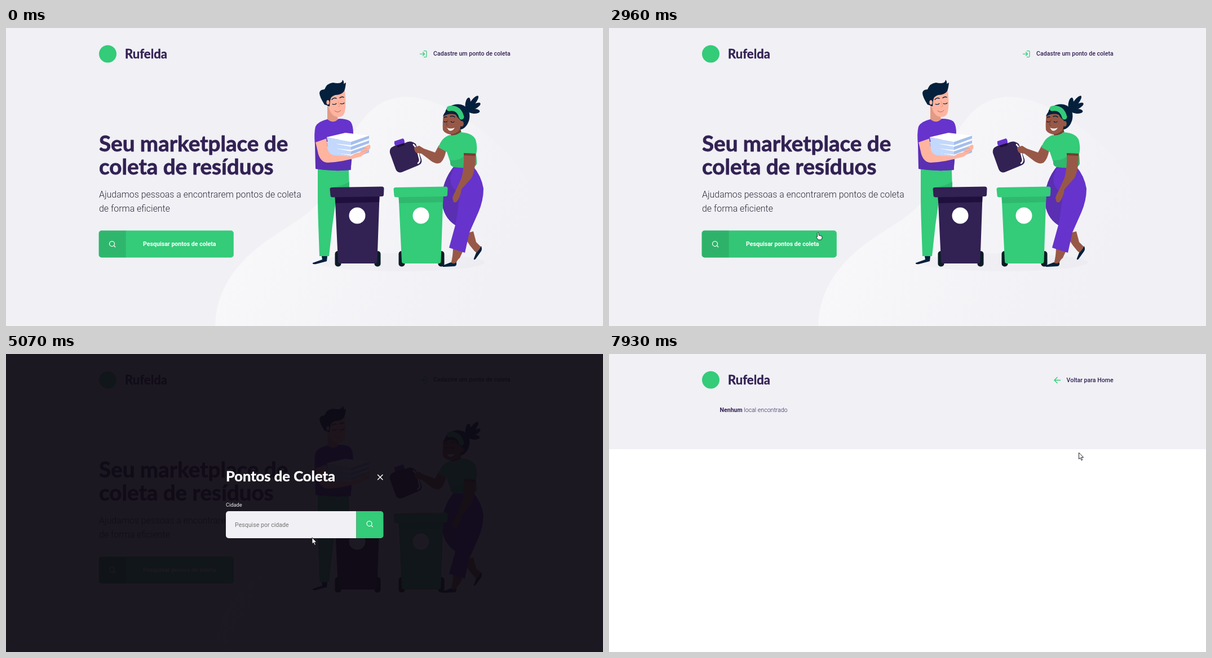
An HTML page with a canvas that plays this animation: 1059x529 px, repeating every 8 s.

```html
<!DOCTYPE html>
<html lang="pt">
<head>
<meta charset="utf-8">
<title>Pontos de coleta</title>
<style>
html, body { margin: 0; width: 100%; height: 100%; overflow: hidden; background: #f0f0f5; }
canvas { display: block; }
</style>
</head>
<body>
<canvas id="stage" width="1059" height="529"></canvas>
<script>
const ctx = document.getElementById('stage').getContext('2d');
const W = 1059, H = 529, LOOP = 8000;
const BG = '#f0f0f5', GREEN = '#34cb79', GREEN_DARK = '#2fb86e', INK = '#322153', TEXT = '#2f2a3a';
const PURPLE = '#6633cc', PURPLE_DARK = '#5a2fb2', NAVY = '#04203c', WHEEL = '#0b1d26';
const SKIN = '#ffb4a0', SKIN_DARK = '#e29a84', BROWN = '#985847', BROWN_DARK = '#70402f';
const BRAND = 'Rufelda';
const HEAD = 'Lato, "Open Sans", sans-serif', BODY = 'Roboto, "Open Sans", sans-serif';

function fill(color, d) {
  ctx.fillStyle = color;
  ctx.fill(new Path2D(d));
}

function line(color, width, d) {
  ctx.strokeStyle = color;
  ctx.lineWidth = width;
  ctx.lineCap = ctx.lineJoin = 'round';
  ctx.stroke(new Path2D(d));
}

function rect(color, x, y, w, h, r = 0) {
  ctx.fillStyle = color;
  ctx.beginPath();
  ctx.roundRect(x, y, w, h, r);
  ctx.fill();
}

function oval(color, x, y, rx, ry = rx, turn = 0) {
  ctx.fillStyle = color;
  ctx.beginPath();
  ctx.ellipse(x, y, rx, ry, turn, 0, Math.PI * 2);
  ctx.fill();
}

function text(str, x, y, size, weight, color, family = BODY) {
  ctx.font = `${weight} ${size}px ${family}`;
  ctx.fillStyle = color;
  ctx.fillText(str, x, y);
  return x + ctx.measureText(str).width;
}

// Bold heading with slightly thickened strokes
function heading(str, x, y, size, color) {
  text(str, x, y, size, 700, color, HEAD);
  ctx.strokeStyle = color;
  ctx.lineWidth = size * .02;
  ctx.lineJoin = 'round';
  ctx.strokeText(str, x, y);
}

function searchIcon(x, y) {
  ctx.strokeStyle = '#fff';
  ctx.lineWidth = 1.25;
  ctx.beginPath();
  ctx.arc(x, y, 4.5, 0, Math.PI * 2);
  ctx.stroke();
  line('#fff', 1.25, `M${x + 3.3},${y + 3.3}l2.500,2.500`);
}

function drawBrand() {
  oval(GREEN, 180.5, 46, 15.5);
  heading(BRAND, 211, 53.5, 22.1, INK);
}

function drawBackdrop() {
  rect(BG, 0, 0, W, H);
  const g = ctx.createLinearGradient(480, 270, 860, 480);
  g.addColorStop(0, '#f8f8fa');
  g.addColorStop(1, BG);
  fill(g, 'M371,529C373,460 412,414 462,378C505,347 545,332 569,288C600,225 625,122 711,122' +
    'C790,124 885,208 918,259C965,330 950,430 900,529Z');
  oval('rgba(50,33,83,.018)', 700, 416, 150, 16);
}

function drawMan() {
  // Legs and shoe
  fill(GREEN, 'M553,249L608,252L609,290L586,300L579,350L573,405L556,405C555,370 553,330 553,300Z');
  fill(GREEN_DARK, 'M609,273L609,283L580,283Q598,280 609,273Z');
  fill(NAVY, 'M560,405L570,405L569,414L550,419Q543,420 544,417L561,411Z');
  // Neck and shirt
  fill(SKIN_DARK, 'M570,138L588,154L589,164Q581,170 570,164Z');
  fill(PURPLE, 'M570,162Q581,171 590,161Q605,161 611,166Q616,172 616,188L611.500,252Q580,255 549,250' +
    'L548,207Q546,186 549,175Q553,166 570,162Z');
  fill(PURPLE_DARK, 'M549,206L568,196L616,200L611.500,252Q580,255 549,250Z');
  // Face
  fill(SKIN, 'M573,124L584,117L601,111Q604,132 601,149Q598,159 588,158Q576,156 573,141Z');
  fill(NAVY, 'M572,139Q570,137 565,136Q556,122 556,115Q557,109 565,109Q569,98 580,97Q589,99 594,97' +
    'Q597,95 597,92Q600,95 599,99L603,97Q602,107 600,112Q595,119 584,119Q576,121 575,129L574,139Z');
  oval(SKIN, 571, 132, 2.6, 4);
  line(NAVY, 1.1, 'M579,135q4,2 7,-1M593,134q4,2 7,-1');
  line(NAVY, 1.5, 'M578,127q4,-4 8,-2M592,124q4,-3 7,-1');
  line(SKIN_DARK, 1, 'M589,130l3,9l-3,1');
  line('#b96557', 1, 'M583,147q6,5 11,-1');
  // Sheets, lowest first
  for (let y = 25; y >= 0; y -= 8.3) {
    fill('#c3d8fc', `M569,${194 + y}l43,8l0,6l-41,-4z`);
    fill('#a4bfec', `M612,${202 + y}l32,-11l0,5l-32,12z`);
    fill('#fff', `M568,${194 + y}l34,-8l42,5l-32,11z`);
  }
  // Arm
  fill(SKIN, 'M549,202L568,195L571,216Q573,224 582,226L612,228Q617,222 627,221L639,210Q643,206 646,208' +
    'Q648,213 643,217L630,228Q596,238 571,239Q559,239 554,224Z');
  fill(PURPLE, 'M548,190L567,186L569,196L549,203Z');
  line(SKIN_DARK, .8, 'M634,215q3,-2 6,-1M632,220q4,-1 8,-3');
}

function drawBin(x, body, shade) {
  const wheel = dx => rect(WHEEL, x + dx, 396, 11, 27.5, 5);
  wheel(9);
  wheel(79);
  ctx.save();
  ctx.translate(x, 0);
  fill(body, 'M9,298L88,298L84,414Q84,418 80,418L18.500,418Q14.500,418 14.500,414Z');
  fill(shade, 'M9,299L88,299L87.6,309L9.6,311Z');
  fill(body, 'M0,286Q0,283 4,283L92,281.500Q96,281.500 96,285L95.500,296Q95.500,299 92,299L5,300.500Q1,300.500 1,297Z');
  ctx.restore();
  oval('#fff', x + 48.5, 333, 14.5);
}

function drawCan() {
  fill(INK, 'M684,212Q693,206 708,204Q718,198 727,206L737,233Q739,241 731,244L702,256Q694,258 691,250' +
    'L681,222Q680,215 684,212Z');
  line('#fff', 2.6, 'M723,207Q728,212 731,222L734,234Q734,238 731,240');
  fill('#1d0f38', 'M692,208L706,203L707,208L695,212Z');
  fill(PURPLE, 'M689,201L704,196Q707,197 707,204L691,209Q688,206 689,201Z');
}

function drawWoman() {
  // Back leg
  fill(BROWN, 'M817,364L829,361L834,380L843,389L837,401L831,396Q822,386 815,374Z');
  fill(NAVY, 'M843,387Q845,392 843,396L833,410Q829,413 830,409L834,399Q839,395 843,387Z');
  // Front foot
  fill(BROWN, 'M793,389L811,395L805,408Q799,413 798,420L789,419Q793,405 793,389Z');
  fill(NAVY, 'M789,416Q794,420 799,416Q800,423 795,423L776,424Q772,423 776,421Z');
  // Trousers
  fill(PURPLE, 'M795,245L829,246Q843,262 847,285Q847,306 838,327L822,363L814,399L786,390L797,350' +
    'Q775,336 773,306Q774,270 795,245Z');
  fill(PURPLE_DARK, 'M795,246Q773,272 773,306Q775,336 797,350Q803,320 804,292Q788,286 788,265Z');
  // Near arm behind the sleeve
  fill(BROWN, 'M768,208L781,216Q778,233 771,239Q764,243 754,236L737,223L728,222Q725,219 726,213' +
    'L731,210L741,214L761,221Z');
  // Neck and shirt
  fill(BROWN_DARK, 'M789,184L806,177L809,193Q799,199 789,193Z');
  fill(GREEN, 'M787,190Q798,192 806,185Q827,186 833,198Q837,212 834,224L835,241Q833,247 821,249L796,247' +
    'Q787,246 788,238L782,220L767,212Q773,194 787,190Z');
  fill(GREEN_DARK, 'M788,235Q805,236 814,226L834,226L835,241Q833,247 821,249L796,247Q787,246 788,235Z');
  // Far arm
  fill(BROWN, 'M812,222L833,223Q833,252 826,266L808,286Q806,301 799,309Q793,311 793,305Q790,302 797,290' +
    'L808,266Q813,249 812,222Z');
  fill(BROWN_DARK, 'M812,222L833,223L832,227L812,226Z');
  // Hair tufts
  for (const [x, y] of [[821, 124], [837, 121], [841, 134], [840, 148]]) {
    const dx = x - 817, dy = y - 147;
    oval(NAVY, 817 + dx * .56, 147 + dy * .56, Math.hypot(dx, dy) * .46, 4.4, Math.atan2(dy, dx));
  }
  // Head
  fill(NAVY, 'M783,141Q806,128 820,144Q826,160 817,173Q811,181 804,180L780,160Q776,151 783,141Z');
  fill(BROWN, 'M776,154Q787,146 799,153Q805,158 808,168L805,181Q799,188 788,189Q778,187 775,181Q774,169 776,154Z');
  fill(NAVY, 'M775,157Q778,146 789,146Q803,149 807,164Q801,160 798,154Q787,150 775,157Z');
  line(GREEN, 9, 'M786,143Q803,140 808,158');
  oval(BROWN, 808.5, 170, 3.4, 5);
  line(NAVY, 1.5, 'M777,159q3,-2 5,-1M788,157q5,-2 8,1');
  line(NAVY, 1.2, 'M777,166q2,2 5,0M789,166q4,3 6,0');
  line(BROWN_DARK, 1, 'M784,163l-3,9l3,1');
  fill('#fff', 'M782,177Q789,180 796,177Q792,184 786,182Z');
}

function drawHome(hover) {
  drawBackdrop();
  drawBrand();
  line(GREEN, 1.25, 'M741.500,40.500h3q1.500,0 1.500,1.500v8q0,1.500 -1.500,1.500h-3M734.500,46h8M739.500,43l3,3l-3,3');
  text('Cadastre um ponto de coleta', 758, 49.4, 10.62, 500, INK);

  heading('Seu marketplace de', 165, 218.5, 38.6, INK);
  heading('coleta de resíduos', 165, 260, 38.6, INK);
  text('Ajudamos pessoas a encontrarem pontos de coleta', 165, 300.5, 15.93, 300, TEXT);
  text('de forma eficiente', 165, 325.7, 15.93, 300, TEXT);

  rect(GREEN, 164.6, 359.6, 239.2, 47.8, 5);
  ctx.globalAlpha = hover;
  rect(GREEN_DARK, 164.6, 359.6, 239.2, 47.8, 5);
  ctx.globalAlpha = 1;
  rect('rgba(0,0,0,.1)', 164.6, 359.6, 48, 47.8, [5, 0, 0, 5]);
  searchIcon(188, 383);
  text('Pesquisar pontos de coleta', 243, 387, 10.62, 700, '#fff');

  drawMan();
  drawBin(574.5, INK, '#1f0f3d');
  drawWoman();
  drawCan();
  fill(BROWN, 'M724,212L733,209L741,214L738,222L728,222Q724,218 724,212Z');
  drawBin(687.5, GREEN, GREEN_DARK);
}

function drawModal(t) {
  rect('rgba(14,10,20,.937)', 0, 0, W, H);
  heading('Pontos de Coleta', 390, 225.5, 25.6, '#fff');
  if (t >= 4370) line('#fff', 1.5, 'M659.500,214.500l8.500,8.500m0,-8.500l-8.500,8.500');
  text('Cidade', 390, 271, 9.3, 400, BG);
  rect(BG, 390, 279, 231.5, 48, [5, 0, 0, 5]);
  text('Pesquise por cidade', 406, 306.5, 10.62, 400, '#757575');
  rect(t >= 5290 ? GREEN_DARK : GREEN, 621.5, 279, 48, 48, [0, 5, 5, 0]);
  if (t >= 5670) {
    line('#fff', 1, 'M622.500,278.500h46q2,0 2,2v45q0,2 -2,2h-46q-2,0 -2,-2v-45q0,-2 2,-2z');
    line('#101010', 1.3, 'M622.500,279.700h45.500q1.500,0 1.500,1.500v43.600q0,1.500 -1.500,1.500h-45.500q-.8,0 -.8,-.8v-45q0,-.8 .8,-.8z');
  }
  searchIcon(644.5, 301);
}

function drawResults() {
  rect('#fff', 0, 0, W, H);
  rect(BG, 0, 0, W, 169);
  drawBrand();
  line(GREEN, 1.4, 'M800.500,46.500h-10M795,41.500l-5,5l5,5');
  text('Voltar para Home', 811.5, 50.2, 10.62, 500, INK);
  const x = text('Nenhum ', 196.5, 102.5, 10.62, 700, INK);
  text('local encontrado', x, 102.5, 10.62, 300, INK);
}

function drawStatus(alpha) {
  ctx.globalAlpha = alpha;
  rect('#35363a', 0, 516, 64.5, 13, [0, 3, 0, 0]);
  text('nodolista:4100/#', 2, 526, 7.5, 400, '#d0d0d4', '"Open Sans", sans-serif');
  ctx.globalAlpha = 1;
}

// Each move: start, end, number of steps, bend point, target
const MOVES = [
  [500, 1270, 11, 690, 330, 604, 199],
  [1350, 1810, 7, 575, 215, 530, 292],
  [2190, 2960, 11, 455, 318, 370, 362],
  [3040, 3270, 4, 345, 376, 327, 380],
  [4600, 5360, 11, 480, 345, 636, 299],
  [5440, 5440, 1, 637, 298, 637, 298],
  [7380, 7930, 8, 690, 312, 833, 175]
];

function pointer(t) {
  let x = 712, y = 532;
  for (const [start, end, steps, bx, by, tx, ty] of MOVES) {
    if (t < start) break;
    const gap = (end - start) / (steps - 1 || 1) || 1;
    const p = Math.min(1, (Math.floor((t - start) / gap + 1e-6) + 1) / steps);
    const e = p * p * (3 - 2 * p), q = 1 - e;
    x = q * q * x + 2 * q * e * bx + e * e * tx;
    y = q * q * y + 2 * q * e * by + e * e * ty;
  }
  return [x, y];
}

function drawPointer(t) {
  const [x, y] = pointer(t);
  const hand = t >= 2960 && t < 4290;
  if ((t >= 4200 && t < 4290) || (t >= 5670 && t < 5830)) oval('rgba(222,222,0,.62)', x + .5, y + .5, 8);
  ctx.save();
  ctx.translate(x, y);
  const d = hand
    ? 'M-.5,2Q1,0 2,2V6L6,7Q8,7 8,9V11L6.500,14H1L-2.500,9Q-2,7.500 -.5,8.500Z'
    : 'M.5,.5V11.500L3,9.200L5,13.700L6.800,12.900L4.900,8.500H8.200Z';
  fill('#fff', d);
  line('#111', .9, d);
  ctx.restore();
}

const ramp = (t, a, b) => Math.max(0, Math.min(1, (t - a) / (b - a)));

function draw(t) {
  if (t >= 6290) {
    drawResults();
  } else {
    drawHome(t < 4600 ? ramp(t, 2880, 3200) : 0);
    if (t >= 4290) drawModal(t);
    if (t >= 3420 && t < 4680) drawStatus(t < 3510 ? .5 : 1);
  }
  if (t >= 500) drawPointer(t);
}

function tick() {
  draw(performance.now() % LOOP);
  requestAnimationFrame(tick);
}
tick();
</script>
</body>
</html>
```
